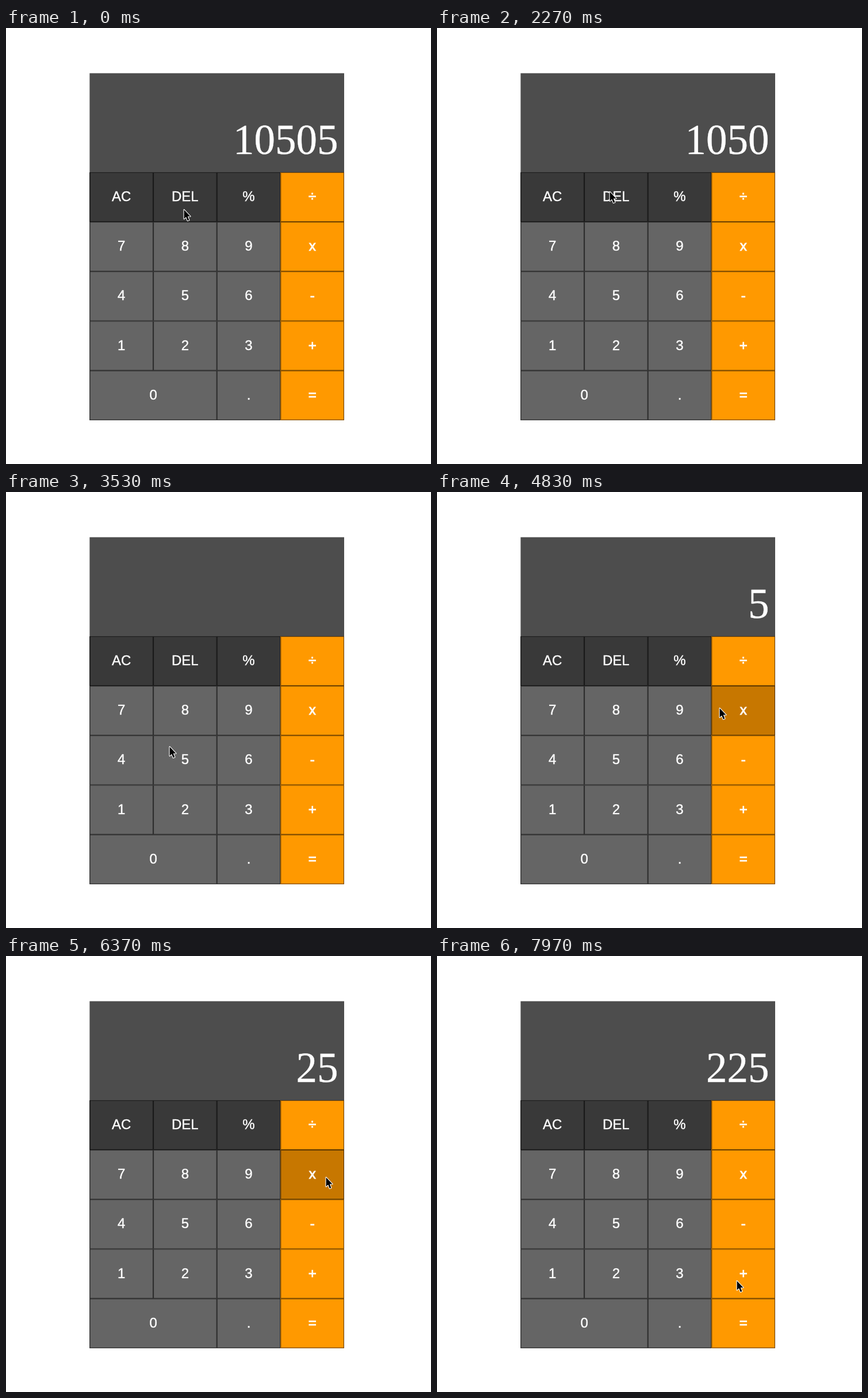
Write an HTML page with a canvas that moves like this. It is 739x758 px and loops after 8000 ms.

```html
<!DOCTYPE html>
<html lang="en">
<head>
<meta charset="utf-8">
<title>Calculator</title>
<style>
  html, body { margin: 0; width: 100%; height: 100%; overflow: hidden; background: #fff; }
  canvas { display: block; }
</style>
</head>
<body>
<canvas id="stage" width="739" height="758"></canvas>
<script>
const ctx = document.getElementById('stage').getContext('2d');
const LOOP = 8000;
const LEFT = 145.4, TOP = 78.6, KEYS_TOP = 250.8;
const KEY_W = 110.65, KEY_H = 86.2;
const LAYOUT = ['AC DEL % ÷', '7 8 9 x', '4 5 6 -', '1 2 3 +', '0 0 . ='].map(r => r.split(' '));
const TONES = { dark: 57, grey: 101 };
const PRESS_SHADE = 0.78;

const moves = [];
const clicks = [];
const readouts = [{ time: 0, text: '10505' }];
const calc = { entry: '10505', held: null, fresh: false };

// Glide to a point; swayX swings out and back, swayY bows the path
function go(start, end, x, y, swayX = 0, swayY = 0) {
  const from = moves.length ? moves[moves.length - 1].to : [309, 315];
  moves.push({ start, end, from, to: [x, y], swayX, swayY });
}

function type(key) {
  if (key === 'DEL') {
    calc.entry = calc.entry.slice(0, -1);
  } else if (key === 'x') {
    calc.held = calc.entry;
    calc.fresh = true;
  } else if (key === '=') {
    calc.entry = String(calc.held * calc.entry);
  } else {
    calc.entry = calc.fresh ? key : calc.entry + key;
    calc.fresh = false;
  }
  return calc.entry;
}

function click(key, down, hold) {
  clicks.push({ key, down, up: down + hold });
  readouts.push({ time: down + hold, text: type(key) });
}

// Delete the number
go(300, 770, 320, 292, -20, -75);
click('DEL', 930, 140);
go(1330, 2070, 300, 284, 80, 300);
go(2400, 2970, 298, 320);
for (let i = 0; i < 5; i++) click('DEL', 2400 + i * 133, 67);

// 5 x 5
go(3010, 3530, 284, 442);
click('5', 3600, 170);
go(3970, 4250, 534, 392);
go(4250, 4430, 491, 375);
click('x', 4570, 300);
go(4840, 5130, 300, 455);
click('5', 5170, 100);
go(5290, 5570, 515, 618);
click('=', 5670, 100);

// x 9
go(5800, 6230, 556, 384);
click('x', 6370, 200);
go(6590, 6740, 440, 390);
click('9', 6770, 70);
go(6860, 7030, 535, 602);
click('=', 7270, 100);
go(7400, 7530, 560, 640);
go(7730, 7970, 521, 564, 15, -60);

const latest = (list, key, t) => list.filter(e => e[key] <= t).pop();
const ease = u => u * u * (3 - 2 * u);

function pointerAt(t) {
  const m = latest(moves, 'start', t) || moves[0];
  const u = ease(Math.max(0, Math.min(1, (t - m.start) / (m.end - m.start))));
  const mix = n => m.from[n] + (m.to[n] - m.from[n]) * u;
  return [
    mix(0) + m.swayX * Math.sin(2 * Math.PI * u),
    mix(1) + m.swayY * Math.sin(Math.PI * u)
  ];
}

function paintText(text, x, y, font, align, weight) {
  ctx.font = font;
  ctx.textAlign = align;
  ctx.fillStyle = ctx.strokeStyle = '#fff';
  ctx.lineWidth = weight;
  ctx.fillText(text, x, y);
  ctx.strokeText(text, x, y);
}

function drawKey(label, row, col, span, t) {
  const x = LEFT + col * KEY_W, y = KEYS_TOP + row * KEY_H;
  const w = KEY_W * span;
  const x0 = Math.round(x), y0 = Math.round(y);
  const operator = col === 3;
  const grey = row === 0 ? TONES.dark : TONES.grey;
  const base = operator ? [255, 153, 0] : [grey, grey, grey];
  const down = clicks.some(c => c.key === label && t >= c.down && t < c.up);
  const shade = down ? PRESS_SHADE : 1;

  ctx.fillStyle = `rgb(${base.map(v => Math.round(v * shade))})`;
  ctx.fillRect(x0, y0, Math.round(x + w) - x0, Math.round(y + KEY_H) - y0);
  ctx.strokeStyle = 'rgba(0,0,0,.56)';
  ctx.lineWidth = 1.1;
  ctx.strokeRect(x + .55, y + .55, w - 1.1, KEY_H - 1.1);
  paintText(label, x + w / 2, Math.round(y + 50.2),
    '24px "Liberation Sans", Arial, sans-serif', 'center', operator ? .9 : .4);
}

function drawReadout(t) {
  ctx.fillStyle = '#4d4d4d';
  ctx.fillRect(LEFT, TOP, KEY_W * 4, Math.round(KEYS_TOP) - TOP);
  paintText(latest(readouts, 'time', t).text, 577.5, 219,
    '73px "Liberation Serif", Times, serif', 'right', .4);
}

function drawPointer([x, y]) {
  ctx.save();
  ctx.translate(x + .6, y + 1);
  ctx.beginPath();
  [[0, 0], [0, 15.8], [3.5, 12.4], [6.2, 19], [8.8, 17.9], [6.2, 11.4], [10.9, 11.4]]
    .forEach(p => ctx.lineTo(...p));
  ctx.closePath();
  ctx.lineJoin = 'round';
  ctx.lineWidth = 2.2;
  ctx.strokeStyle = '#fff';
  ctx.stroke();
  ctx.fillStyle = '#000';
  ctx.fill();
  ctx.restore();
}

function draw(t) {
  ctx.fillStyle = '#fff';
  ctx.fillRect(0, 0, 739, 758);
  drawReadout(t);
  LAYOUT.forEach((keys, row) => keys.forEach((label, col) => {
    if (label === keys[col - 1]) return;
    drawKey(label, row, col, label === keys[col + 1] ? 2 : 1, t);
  }));
  drawPointer(pointerAt(t));
}

const begin = performance.now();
function tick() {
  draw((performance.now() - begin) % LOOP);
  requestAnimationFrame(tick);
}
tick();
</script>
</body>
</html>
```
